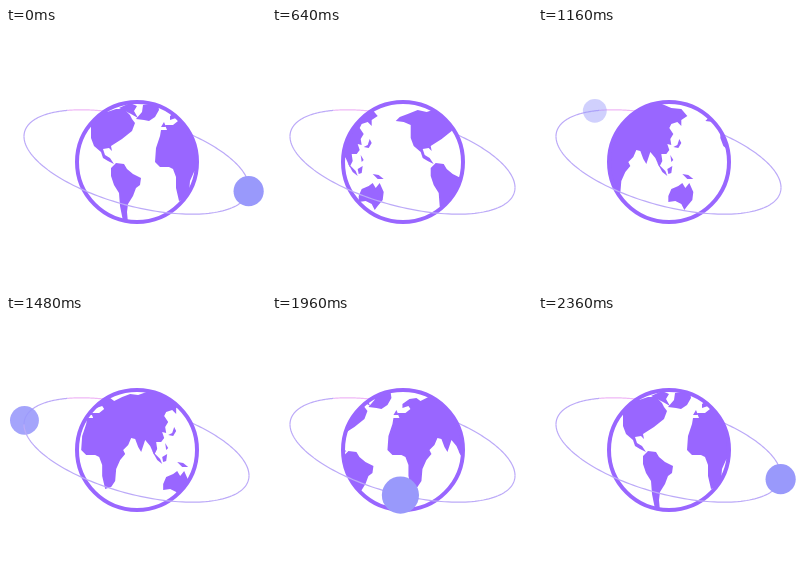
An HTML page with a canvas for the animation above (2400 ms loop, 260 by 260 pixels).

```html
<!DOCTYPE html>
<html lang="en">
<head>
<meta charset="utf-8">
<title>Globe with orbit</title>
<style>
  html, body { margin: 0; width: 100%; height: 100%; overflow: hidden; background: #fff; }
  canvas { display: block; width: 260px; height: 260px; }
</style>
</head>
<body>
<canvas id="stage"></canvas>
<script>
const SIZE = 260, STEP = 40, STEPS = 60, LAST = STEPS - 1;
const CX = 131, CY = 134, RADIUS = 60;
const MAP_WIDTH = 198;
const PURPLE = '#9966ff', LINE = '#bcaaf8', PINK = '#efb8f6', BADGE = '#9999fb';

const canvas = document.getElementById('stage');
const ctx = canvas.getContext('2d');
const dpr = window.devicePixelRatio || 1;
canvas.width = canvas.height = SIZE * dpr;
ctx.scale(dpr, dpr);

// Flat map coastlines, in stage pixels at the start of the loop.
const LAND = [
  // North America
  'M70 93L74 89L82 86L92 82L101 84L110 81L118 81L124 87L126 91L129 95L126 103L116 111L105 118L106 123L103 120L97 121L99 127L104 130L108 136L102 133L97 130L95 124L88 118L85 110L85 97L78 94Z',
  // Arctic islands and Greenland
  'M113 80L124 75L131 78L128 83L132 90L125 86Z',
  'M130 91L136 84L137 77L152 75L153 82L149 89L143 93L138 92Z',
  // South America
  'M105 140L110 135L118 136L121 141L127 146L135 150L134 157L130 160L127 168L122 176L121 184L122 195L117 193L114 178L113 165L108 157L105 148Z',
  // Europe, Asia and Africa
  'M154 108L155 102L161 102L159 97L167 97L172 93L170 90L164 92L164 88L171 83L178 82L182 85L190 81L198 78L206 79L220 74L234 80L244 81L250 88L244 92L244 98L240 94L234 96L232 100L236 106L233 111L234 117L230 116L232 122L229 126L224 126L225 133L222 139L218 130L213 124L211 130L209 136L206 131L203 123L199 122L196 129L191 134L193 138L188 144L184 153L183 165L179 171L173 173L170 160L170 149L167 141L163 139L154 139L149 134L150 120Z',
  // British Isles and Japan
  'M155 99L158 94L160 99Z',
  'M236 119L240 117L242 111L244 115L241 120Z',
  // South-east Asia
  'M220 135L228 143L230 148L225 144Z',
  'M230 141L235 138L234 145L231 146Z',
  'M233 127L236 132L234 134Z',
  'M245 146L251 147L256 151L250 151Z',
  // Australia
  'M231 168L234 161L241 158L245 155L248 160L252 155L256 164L255 172L250 178L247 182L244 176L238 173L231 174Z'
].map(d => new Path2D(d));

// Step and orbit angle: slow behind the globe, fast in front.
const ORBIT = [[0, .08], [8, -.69], [16, -1.32], [29, -2.285], [37, -3.05],
  [42, -3.586], [49, -4.694], [56, -5.73], [59, .08 - 2 * Math.PI]];

function knot(i) {
  const n = ORBIT.length - 1;
  const turn = Math.floor(i / n);
  const [step, angle] = ORBIT[i - turn * n];
  return [step + turn * LAST, angle - turn * 2 * Math.PI];
}

function slope(i) {
  const a = knot(i - 1), b = knot(i + 1);
  return (b[1] - a[1]) / (b[0] - a[0]);
}

function angleAt(step) {
  let i = 0;
  while (i < ORBIT.length - 2 && step > ORBIT[i + 1][0]) i++;
  const [s0, a0] = knot(i), [s1, a1] = knot(i + 1);
  const h = s1 - s0, u = (step - s0) / h, v = 1 - u;
  return v * v * (1 + 2 * u) * a0 + u * u * (3 - 2 * u) * a1
    + h * u * v * (v * slope(i) - u * slope(i + 1));
}

function orbitPoint(angle) {
  return [130.5 + 112.5 * Math.cos(angle), 134 + 52.2 * Math.sin(angle + .512)];
}

function drawArc(from, to, color) {
  ctx.beginPath();
  for (let i = 0; i <= 90; i++) ctx.lineTo(...orbitPoint(from + (to - from) * i / 90));
  ctx.strokeStyle = color;
  ctx.lineWidth = 1.2;
  ctx.stroke();
}

function disc(x, y, r, color) {
  ctx.beginPath();
  ctx.arc(x, y, r, 0, 2 * Math.PI);
  ctx.fillStyle = color;
  ctx.fill();
}

function drawGlobe(shift) {
  disc(CX, CY, RADIUS, '#fff');
  ctx.save();
  ctx.clip();
  ctx.fillStyle = PURPLE;
  for (let turn = -2; turn <= 1; turn++) {
    ctx.save();
    ctx.translate(shift + turn * MAP_WIDTH, 0);
    LAND.forEach(path => ctx.fill(path));
    ctx.restore();
  }
  ctx.restore();
  ctx.beginPath();
  ctx.arc(CX, CY, RADIUS, 0, 2 * Math.PI);
  ctx.strokeStyle = PURPLE;
  ctx.lineWidth = 4;
  ctx.stroke();
}

function drawBadge(angle) {
  const depth = Math.sin(angle);
  const [x, y] = orbitPoint(angle);
  ctx.globalAlpha = Math.max(.45, Math.min(1, .95 + .65 * depth));
  disc(x, y, 14.8 + 3.8 * depth, BADGE);
  ctx.globalAlpha = 1;
}

function draw(step) {
  const angle = angleAt(step);
  const inFront = Math.sin(angle) > 0;
  ctx.fillStyle = '#fff';
  ctx.fillRect(0, 0, SIZE, SIZE);
  drawArc(-Math.PI, -2.23, LINE);
  drawArc(-2.23, -1.85, PINK);
  drawArc(-1.85, 0, LINE);
  if (!inFront) drawBadge(angle);
  drawGlobe(MAP_WIDTH * step / LAST);
  drawArc(0, Math.PI, LINE);
  if (inFront) drawBadge(angle);
}

function tick() {
  draw(Math.floor(performance.now() / STEP) % STEPS);
  requestAnimationFrame(tick);
}
tick();
</script>
</body>
</html>
```
